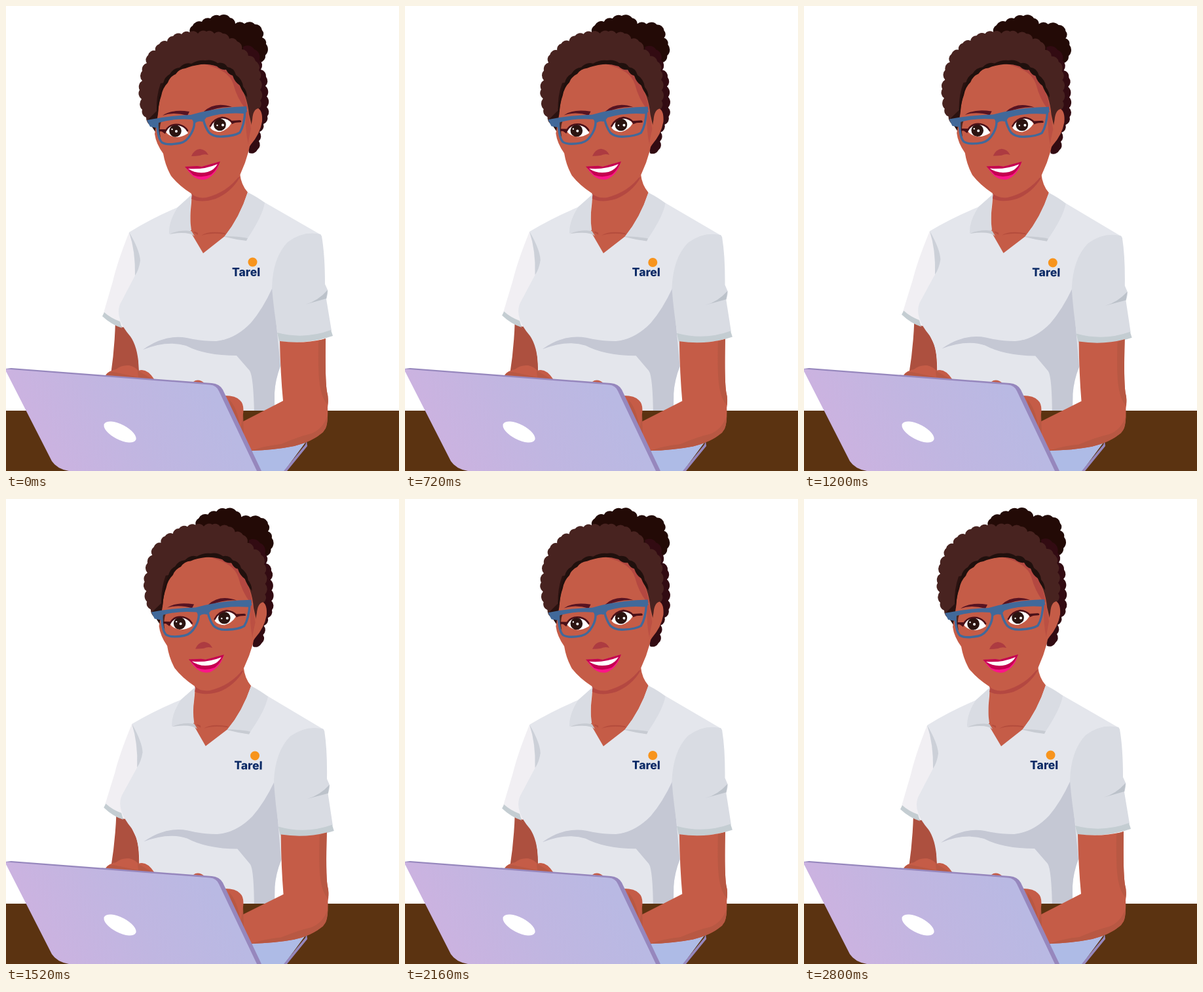
Recreate the animation shown at these times as an HTML page. Size 600x709 px, loop 2880 ms.

```html
<!DOCTYPE html>
<html lang="pt">
<head>
<meta charset="utf-8">
<title>Working at the laptop</title>
<style>
  html, body { margin: 0; width: 100%; height: 100%; overflow: hidden; background: #fff; }
  svg { display: block; width: 600px; height: 709px; }
  .skin { fill: #c55c47; }
  .shade { fill: #b44841; }
  .dim { fill: #b85843; }
  .cloth { fill: #e4e6ec; }
  .sleeve { fill: #d9dce3; }
  .hem { fill: #c4cdd2; }
  .fold { fill: #c5c8d4; }
  .hair { fill: #482320; }
  .bun { fill: #230a06; }
  .back { fill: #320b12; }
  .line { fill: #20100d; }
  .brow { fill: #571322; }
  .frame { fill: #41699a; }
  .rim { fill: none; stroke: #41699a; stroke-width: 3.4; stroke-linejoin: round; }
  .lash { fill: none; stroke: #4a1018; stroke-width: 2.6; stroke-linecap: round; }
  .iris { fill: #2b1411; }
  .white { fill: #fff; }
  .edge { fill: #9687bd; }
  .name { font: 800 17.5px Inter, "Open Sans", sans-serif; fill: #0b2a66; }
</style>
</head>
<body>
<svg viewBox="0 0 600 709" xmlns="http://www.w3.org/2000/svg">
  <defs>
    <linearGradient id="lid" gradientUnits="userSpaceOnUse" x1="40" y1="690" x2="300" y2="560">
      <stop offset="0" stop-color="#cdb2e0"/>
      <stop offset=".55" stop-color="#c0b6e1"/>
      <stop offset="1" stop-color="#b9b9e3"/>
    </linearGradient>
  </defs>

  <g id="armL">
    <path fill="#ad503f" d="M167 480L182 484L198 516Q203 530 203 562L160 562Q166 522 167 480Z"/>
  </g>

  <g id="body">
    <!-- hair behind the head -->
    <path class="bun" data-curl="281,41 285,30 299,24 312,19 326,15 342,18 350,27 364,27 380,28 391,37 391,48 397,58 396,75 388,86" data-rest="L360 100L300 60Z"/>
    <path class="back" data-curl="362,62 379,66 387,82 389,97 397,108 396,122 398,138 398,154 399,168 393,180 387,192 386,206 384,219 371,224" data-rest="L362 180Z"/>

    <!-- shirt -->
    <path fill="#f1eff3" d="M188 345Q170 390 163 420L149 468L163 480L178 490L205 480V380Z"/>
    <path class="hem" d="M150 467L147 473Q161 486 177 491L174 481Q160 476 150 467Z"/>
    <path class="cloth" d="M284 288L262 307Q222 324 188 345Q197 372 197 411Q187 430 176 451Q169 463 174 478Q178 490 190 504Q202 521 203 556V625H410V590Q411 570 419 549L455 505L481 349L394 299L369 285Z"/>
    <path fill="#ccd0d8" d="M188 345Q204 372 205 388Q203 402 197 411Q198 374 188 345Z"/>
    <path class="fold" d="M407 429Q392 462 374 483Q350 508 321 511Q296 511 276 506Q242 500 209 524Q246 509 275 518Q304 533 352 533L372 556Q378 565 379 625H410V590Q411 570 419 549L414 498Z"/>
    <path class="sleeve" d="M480 348Q454 342 430 360Q407 384 406 430Q409 466 415 500Q458 511 497 495L489 447Q492 437 491 433L487 424Q487 380 482 351Z"/>
    <path fill="#bcc2ca" d="M457 455Q476 450 491 433L489 446Q475 450 457 455Z"/>
    <path class="hem" d="M414 498Q456 509 496 494L499 503Q458 517 417 511Z"/>

    <!-- neck and collar -->
    <path class="skin" d="M284 280L283 300Q280 325 282 345L301 377L334 351Q357 322 369 284Q359 273 357 255L330 240Z"/>
    <path fill="#b54d3d" d="M298 350Q309 342 334 346L335 348Q312 345 298 350ZM288 344L293 346V349L286 345Z"/>
    <path class="shade" d="M283 286V294Q297 301 320 294Q344 284 357 261L340 262Z"/>
    <path class="sleeve" d="M284 287L262 307Q248 329 249 347L283 342Q279 318 284 287Z"/>
    <path fill="#c7cbd2" d="M249 348Q264 341 283 343L288 351Q278 343 249 348Z"/>
    <path class="sleeve" d="M369 284Q385 292 395 300Q392 320 367 357L334 351Q357 322 369 284Z"/>
    <path fill="#c7cbd2" d="M334 351Q354 351 369 354L367 358Q350 356 334 352Z"/>

    <!-- head -->
    <path class="hair" data-curl="227,184 214,170 208,158 207,142 204,128 208,114 208,99 215,87 217,75 228,68 234,58 246,54 255,46 268,43 280,40 293,42 306,39 318,42 331,42 341,50 353,54 360,66 370,76 381,84 386,98 387,112 388,128 388,144 386,157" data-rest="Q378 166 374 188L366 150L300 90L238 120Z"/>
    <path fill="#2a1210" d="M236 118Q229 138 230 160L216 174L228 192L242 180L250 115Z"/>
    <path class="skin" d="M376 173Q377 158 385 156Q392 160 391 176Q388 195 374 211L368 220Z"/>
    <path class="skin" d="M240 125Q250 104 268 96Q296 84 325 91Q344 99 353 116Q368 135 371 165L376 186Q374 222 357 258Q338 284 306 292Q291 294 283 286Q264 274 252 259Q243 243 240 225Q229 210 227 195L232 165Q233 142 240 125Z"/>
    <path class="shade" d="M303 89Q330 90 345 105Q364 126 369 158L365 156Q353 141 347 119Q340 97 303 89Z"/>
    <path class="shade" d="M366 160L369 160L374 187Q370 205 370 211Q365 190 366 160Z" opacity=".6"/>
    <path class="line" d="M230 158Q233 137 240 118Q242 108 250 104Q255 95 265 94Q273 85 283 88Q293 82 304 83Q315 81 323 87Q333 85 338 93Q348 94 351 105Q361 112 362 123Q368 130 368 139Q360 130 357 121Q349 116 346 106Q340 105 336 97Q328 98 322 92Q309 88 298 89Q283 91 274 95Q264 96 259 104Q250 108 247 117Q239 125 237 137Q233 148 232 163Z"/>

    <!-- brows and eyes -->
    <path class="brow" d="M239 167Q253 157 280 161L277 167Q256 161 239 167ZM302 161Q319 145 345 154Q324 153 305 162Z"/>
    <path fill="#4b2721" d="M231 177L237 176Q233 186 236 201Q231 191 231 177Z"/>
    <path class="white" d="M244 192Q249 180 264 181Q274 184 278 194Q269 200 260 200Q249 199 244 192Z"/>
    <path class="white" d="M312 186Q315 174 329 171Q340 171 344 179Q338 189 327 192Q317 192 312 186Z"/>
    <circle class="iris" cx="258.500" cy="190.500" r="9.300"/>
    <circle class="iris" cx="326.500" cy="181" r="9.300"/>
    <g class="white">
      <circle cx="260" cy="191" r="2"/><circle cx="253.500" cy="188" r="1.200"/>
      <circle cx="331" cy="181.500" r="2"/><circle cx="322.500" cy="182" r="1.200"/>
    </g>
    <path class="lash" d="M234 190L244 190Q250 179 264 181Q273 183 277 190M312 183Q317 172 330 170Q340 171 345 177L358 176"/>
    <path fill="#4a1018" d="M233 188L246 188L243 195ZM343 175L359 174L345 180Z"/>

    <!-- glasses -->
    <path class="rim" d="M231 176Q231 201 238 208Q246 213 266 209Q276 207 283 194Q289 183 287 173M301 172Q304 185 310 193Q317 200 331 199Q349 198 357 193Q364 182 365 159"/>
    <path class="frame" d="M215 174Q249 167 282 166L297 162Q330 154 367 153L368 161L363 164Q331 162 306 170Q300 178 298 176Q293 175 288 179L284 173Q256 171 233 178L231 186L220 184Z"/>

    <!-- nose and mouth -->
    <path fill="#ad3b41" d="M283 229Q287 219 296 218Q305 219 309 227Q302 225 296 228Q290 229 283 229Z"/>
    <path fill="#fb1588" d="M275 247Q302 250 326 239Q322 256 306 264Q289 269 275 247Z"/>
    <path fill="#c50050" d="M273 245L292 244L299 245L306 243L327 237Q322 250 313 257Q299 263 286 258Z"/>
    <path class="white" d="M278 248Q302 250 323 241Q318 250 308 253Q291 257 278 248Z"/>

    <!-- badge on the shirt -->
    <circle cx="376.500" cy="390.500" r="7" fill="#f7941d"/>
    <text class="name" x="345" y="411.500">Tarel</text>
  </g>

  <path fill="#5b3311" d="M0 617H600V709H0Z"/>

  <!-- laptop base, arm and hands -->
  <path fill="#aebbe6" d="M360 681L459 663L425 709H370Z"/>
  <path class="edge" d="M459 663L460 671L429 709H424L457 669Z"/>
  <g id="armR">
    <path class="skin" d="M418 511Q419 560 423 602L355 637L374 678Q410 677 440 671Q477 661 488 644Q492 635 491 612Q493 600 490 588Q487 570 488 507Q455 516 418 511Z"/>
    <path class="dim" d="M477 511Q476 565 480 583Q483 599 491 608Q493 598 490 588Q487 570 488 507Z"/>
    <path class="dim" d="M374 678Q398 670 420 668Q448 656 466 652Q484 645 491 624Q491 642 484 650Q466 665 440 671Q410 677 374 678Z"/>
  </g>
  <path class="skin" d="M151 566Q153 557 168 554Q176 547 188 548Q197 550 202 556Q215 551 227 570ZM286 573Q294 567 304 576ZM330 594Q350 593 357 601Q364 607 362 622L360 650H345Z"/>
  <path class="dim" d="M151 566Q154 557 164 558L202 566L201 556L208 560L222 568V574ZM341 600Q354 614 358 645L362 622L363 655H350Z"/>

  <!-- lid -->
  <path class="edge" d="M0 553L8 552L314 575Q326 576 331 585L390 709H370L300 590L0 557Z"/>
  <path fill="url(#lid)" d="M0 553.500L311 577.500Q321 578 325 587L383 709H96Q78 706 70 694L0 557Z"/>
  <ellipse class="white" cx="174" cy="649.500" rx="27" ry="11.500" transform="rotate(27 174 649.500)"/>
</svg>
<script>
  const LOOP = 2880, STEP = 80, LEAN = 0.9;

  // Wavy outline: one shallow arc between each pair of points.
  function curl(path) {
    const pts = path.dataset.curl.split(" ").map(p => p.split(",").map(Number));
    const arcs = pts.slice(1).map(([x, y], i) => {
      const r = Math.hypot(x - pts[i][0], y - pts[i][1]) * 0.72;
      return `A${r} ${r} 0 0 1 ${x} ${y}`;
    });
    path.setAttribute("d", "M" + pts[0] + arcs.join("") + path.dataset.rest);
  }
  document.querySelectorAll("[data-curl]").forEach(curl);

  const parts = [
    ["body", 1, 315, 617],
    ["armR", 0.8, 372, 648],
    ["armL", 1, 182, 575]
  ].map(([id, gain, x, y]) => ({ el: document.getElementById(id), gain, x, y }));

  function draw(now) {
    const t = Math.floor((now % LOOP) / STEP) * STEP;
    const angle = LEAN * (1 - Math.cos(2 * Math.PI * t / LOOP)) / 2;
    for (const p of parts) {
      p.el.setAttribute("transform", `rotate(${angle * p.gain} ${p.x} ${p.y})`);
    }
  }
  function tick() {
    draw(performance.now());
    requestAnimationFrame(tick);
  }
  tick();
</script>
</body>
</html>
```
